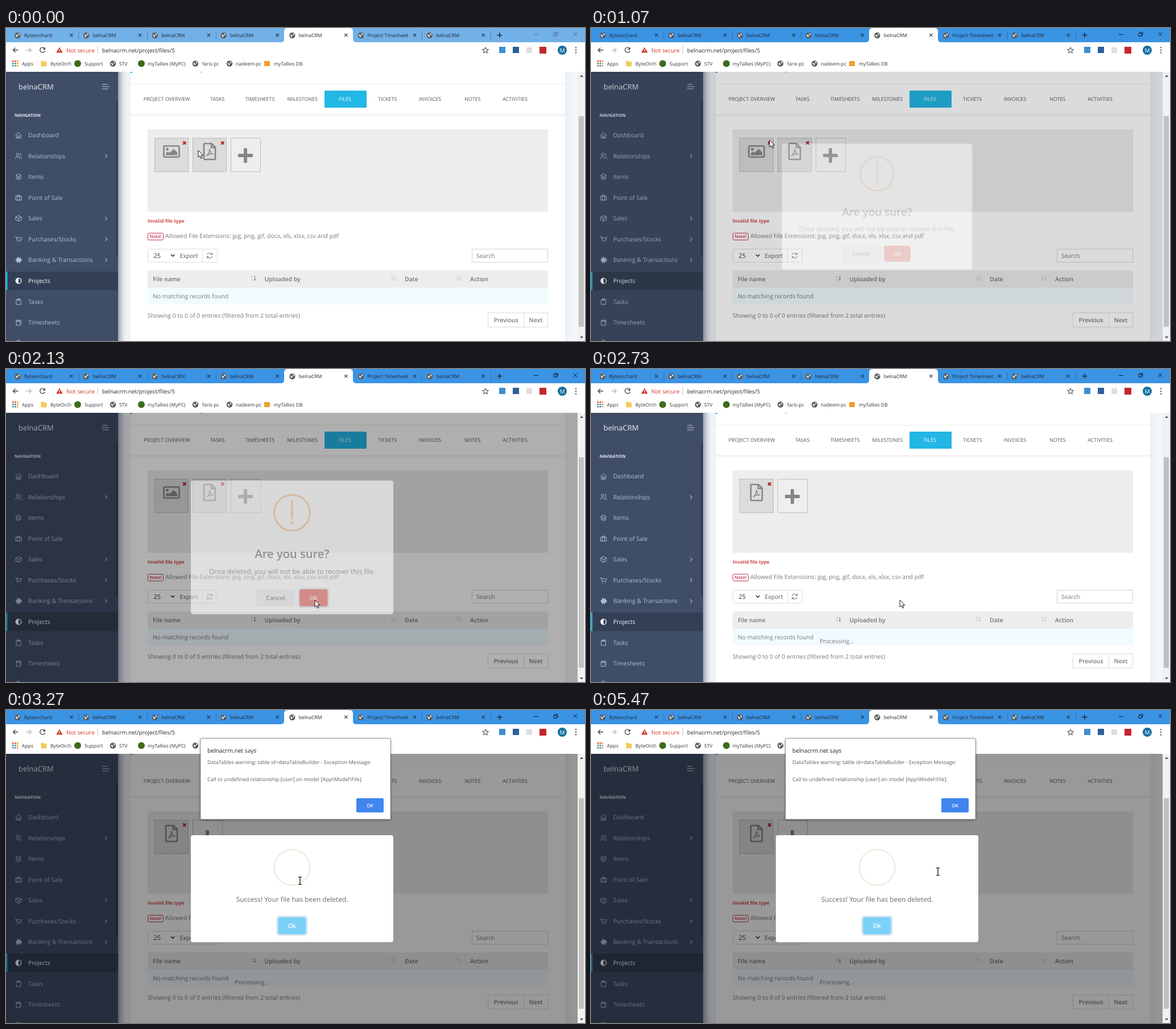
An HTML page for the animation above (6.59 s loop, 1018 by 550 pixels).

```html
<!DOCTYPE html>
<html lang="en">
<head>
<meta charset="utf-8">
<title>Project files</title>
<style>
html, body { margin: 0; width: 100%; height: 100%; overflow: hidden; background: #fff; }
svg { display: block; }
text { font-family: "Open Sans", "Noto Sans", sans-serif; text-rendering: geometricPrecision; white-space: pre; }
</style>
</head>
<body>
<svg id="stage" width="1018" height="550" viewBox="0 0 1018 550"></svg>
<script>
const LOOP = 6590, BRAND = 'belnaCRM', HOST = 'belnacrm.net';
const BASE = 10.43;

// Drawing helpers, all return SVG markup
const text = (x, y, s, size = BASE, fill = '#777', more = '') =>
  `<text x="${x}" y="${y}" font-size="${size}" fill="${fill}" ${more}>${s}</text>`;
const mid = 'text-anchor="middle" ', semi = 'font-weight="600"', bold = 'font-weight="700"';
const rect = (x, y, w, h, fill, more = '') =>
  `<rect x="${x}" y="${y}" width="${w}" height="${h}" fill="${fill}" ${more}/>`;
const dot = (x, y, r, fill, more = '') => `<circle cx="${x}" cy="${y}" r="${r}" fill="${fill}" ${more}/>`;
const line = (d, stroke, w = 1, more = '') =>
  `<path d="${d}" fill="none" stroke="${stroke}" stroke-width="${w}" ${more}/>`;
const fill = (d, color, more = '') => `<path d="${d}" fill="${color}" ${more}/>`;
const at = (x, y, body) => `<g transform="translate(${x} ${y})">${body}</g>`;
const group = (id, body) => `<g id="${id}">${body}</g>`;
const cross = (x, y, r, color, w) =>
  line(`M${x - r} ${y - r}l${2 * r} ${2 * r}m0 ${-2 * r}l${-2 * r} ${2 * r}`, color, w);
const globe = (x, y) => at(x, y, dot(0, 0, 5.2, '#55595e') +
  fill('M-4-1.5L-1-1 1 1-1 3.5-2.5 1.5ZM0-4L3.6-2.5 3 .5 1-1.5Z', '#e4e7ea'));

function browser() {
  const tabs = ['Byteorchard', BRAND, BRAND, BRAND, BRAND, 'Project Timesheet', BRAND];
  let s = rect(0, 0, 1018, 25, '#72b0e8', 'id="bar"') + rect(0, 25, 1018, 52, '#fff') +
    fill('M483 25q6 0 6-6V6q0-6 6-6H604q6 0 6 6V19q0 6 6 6z', '#fff');
  tabs.forEach((name, i) => {
    const x = 32 + i * 120.7;
    s += globe(x - 11.5, 13) + `<svg x="${x}" y="0" width="74" height="25">` +
      text(0, 16, name, 8.6, '#20272f') + '</svg>' + cross(x + 83, 12.5, 2.6, '#26313c', 1.1);
    if (i != 3 && i != 4) s += rect(x + 95.5, 6, 1, 14, '#32587c', 'opacity=".55"');
  });
  s += line('M863.5 12.5h9M868 8v9', '#1c2a38', 1.4) +
    group('win', line('M928 11.5h8M963 9.5h5v5h-5zM965 9.500V7.500h5v5h-2M997.5 7.500l6.500 6.500m0-6.500l-6.500 6.500', 'currentColor'));

  // Address row
  s += line('M21.5 38.8h-9m4-4l-4 4 4 4', '#45494d', 1.4) +
    line('M35.5 38.8h9m-4-4l4 4-4 4', '#b9bbbd', 1.4) +
    line('M68 36a4.5 4.5 0 1 0 .6 4', '#45494d', 1.4) + fill('M69 33.5v4.5h-4.5z', '#45494d') +
    fill('M94 33.5l5.8 10H88.2z', '#d23f31') + rect(93.4, 37, 1.2, 3, '#fff') + rect(93.4, 41, 1.2, 1.2, '#fff') +
    text(106, 42.5, 'Not secure', 9.85, '#d0342a') + rect(161, 32, 1, 13, '#c8c8c8') +
    text(169, 42.5, HOST + '/project/files/5', 9.85, '#26292c') +
    line('M843 34l1.5 3.3 3.6.4-2.7 2.4.8 3.6-3.2-1.9-3.2 1.9.8-3.6-2.7-2.4 3.6-.4z', '#555', 1.1) +
    rect(867, 33, 11, 11, '#3f8fd0') + rect(891, 33, 11, 11, '#2d5f9a') +
    rect(915, 34, 10, 10, '#dedede') + rect(938, 33, 12, 12, '#c2272d') +
    dot(978, 39, 8, '#146f9f') + text(978, 42.5, 'M', 10, '#fff', mid) +
    [34.5, 39, 43.5].map(y => dot(1002, y, 1.2, '#55595e')).join('');

  // Bookmarks
  const hues = ['#e04a3a', '#e04a3a', '#e8a02c', '#3c9b57', '#3d7fe0', '#e8a02c', '#3c9b57', '#3d7fe0', '#e8a02c'];
  hues.forEach((c, i) => s += rect(11 + i % 3 * 4, 57 + (i / 3 | 0) * 4, 2.6, 2.6, c));
  s += fill('M61.5 57.5h4l1 1.5h5v8.5h-10z', '#f3cb5c') + dot(126, 62.5, 6, '#3d6b1d') + dot(238, 62.5, 6, '#3d6b1d') +
    globe(188, 62.5) + globe(333, 62.5) + globe(393, 62.5) + rect(454, 58, 10, 9, '#f0a030');
  [[28, 'Apps'], [78, 'ByteOrch'], [138, 'Support'], [199, 'STV'], [249, 'myTallies (MyPC)'],
   [345, 'faris-pc'], [404, 'nadeem-pc'], [471, 'myTallies DB']]
    .forEach(([x, name]) => s += text(x, 66, name, 8.6, '#33373b'));
  return s;
}

function sidebar() {
  const items = [
    ['Dashboard', 'M-5 0L0-5 5 0M-4-1V5H4V-1M-1.2 5V1H1.2V5'],
    ['Relationships', 'M-5 5V4q0-3 3.5-3t3.5 3V5M-1.5-5a2 2 0 0 1 0 4.2a2 2 0 0 1 0-4.2M2.5-4.5a2 2 0 0 1 0 4M5.3 5V4q0-2-2-2.6', 1],
    ['Items', 'M0-5L5-2.5 0 0-5-2.5ZM-5 0L0 2.5 5 0M-5 2.5L0 5 5 2.5'],
    ['Point of Sale', 'M-5-2.5H5V4.5H-5ZM-2-2.5V-4.5H2V-2.5M-2-2.5V4.5M2-2.5V4.5'],
    ['Sales', 'M0-5L5-2.5V2.5L0 5-5 2.5V-2.5ZM-5-2.5L0 0 5-2.5M0 0V5', 1],
    ['Purchases/Stocks', 'M-6-4.5H-4L-2.5 2H4L5.5-2.5H-3.5M-2 4v1.4M3.5 4v1.4', 1],
    ['Banking &amp; Transactions', '', 1],
    ['Projects', ''],
    ['Tasks', 'M-4-3.5H4V5H-4ZM-1.8-5H1.8V-2.5H-1.8Z'],
    ['Timesheets', 'M-4-3.5H4V5H-4ZM-4-2H4M-2-5V-3M2-5V-3M1 1H4'],
  ];
  const piggy = '<ellipse rx="4.6" ry="3.6"/><path d="M3-2L5-1H6V2H4.500ZM1-3l3-2v3zM-3 2h2v3h-2zM1 2h2v3h-2zM-6.500-1.500l2 .5v1.500z"/><circle cx="-1" cy="-4" r="1.400"/>';
  let s = rect(0, 77, 197, 473, '#3f4d67') + rect(193, 129, 4, 271, '#343f55') +
    rect(0, 428, 197, 32.5, '#333f54') + rect(0, 428, 2.5, 32.5, '#23b7e5') +
    text(22, 107.5, BRAND, 13, '#eef1f6') +
    line('M169 99h9M169 103h13M169 107h11', '#c3cbdb', 1.1) +
    text(15, 155.8, 'NAVIGATION', 7.3, '#e8ecf4', bold);
  items.forEach(([name, icon, sub], i) => {
    const y = 188.4 + i * 36.55, on = name == 'Projects', c = on ? '#fff' : '#b3bfd5';
    s += at(22, y, line(icon, c)) + text(39, y + 3.7, name, BASE, c);
    if (sub) s += line(`M174.5 ${y - 3}l3 3-3 3`, c, 1.1);
    if (on) s += dot(22, y, 4.8, 'none', 'stroke="#fff" stroke-width="1.3"') + fill(`M22 ${y - 5}a5 5 0 0 0 0 10z`, '#fff');
    if (i == 6) s += at(22, y, `<g fill="${c}">${piggy}</g>`);
  });
  return s + line('M19 550v-1h6', '#b3bfd5');
}

const tile = (x, w, bg) => rect(x, 193.5, w, 59, bg, 'stroke="#a6a6a6" stroke-dasharray="2 1"');
const fileTile = (x, icon) => tile(x + .5, 59, '#dcdcdc') + at(x + 30, 217, icon) + cross(x + 52.8, 202, 2.6, '#b30d12', 2);
const pdfIcon = line('M-10-12.5q0-1.5 1.5-1.5H3.5L10-7.5V12.5q0 1.5-1.5 1.5H-8.500q-1.5 0-1.5-1.5ZM3-14V-7H10', '#868686', 2.6) +
  line('M-6 8Q0 4 0-4.5 1 4 6.5 4.5 0 3-6 8Z', '#868686', 1.5);
const imageIcon = rect(-13.5, -9.8, 27, 19.6, 'none', 'rx="2" stroke="#868686" stroke-width="2.6"') +
  dot(-7.5, -4, 2.4, '#868686') + fill('M-10 6.5V3.5L-6.5 0-3.500 2.5 4-4.5 10 1.5V6.5Z', '#868686');
const plusTile = x => tile(x + .5, 52, '#eee') +
  rect(x + 13, 221, 26, 6, '#868686', 'rx="1.5"') + rect(x + 23, 211, 6, 26, '#868686', 'rx="1.5"');

function content() {
  let s = rect(197, 77, 809, 473, '#f4f7fa') +
    rect(219, 40, 764, 550, '#fff', 'style="filter:drop-shadow(0 1px 7px #455a6418)"') +
    rect(197, 77, 16, 473, 'url(#shade)') +
    rect(219, 77, 3, 2, '#23b7e5') + rect(341, 77, 4, 1, '#d2c25a') +
    rect(219, 98, 764, 1, '#eee') + rect(219, 151, 764, 6, 'url(#fall)') +
    rect(560, 110, 74, 30, '#23b7e5', 'rx="1.5"');
  ['PROJECT OVERVIEW', 'TASKS', 'TIMESHEETS', 'MILESTONES', 'FILES', 'TICKETS', 'INVOICES', 'NOTES', 'ACTIVITIES']
    .forEach((name, i) => s += text(i ? 297 + i * 74.75 : 282.7, 128.2, name, 8.94, i == 4 ? '#fff' : '#555', mid));
  s += rect(249, 178, 704, 145, '#ededed') +
    group('before', fileTile(261, imageIcon) + fileTile(328, pdfIcon) + plusTile(395)) +
    group('after', fileTile(261, pdfIcon) + plusTile(328)) +
    text(249, 341.5, 'Invalid file type', 8.4, '#cf4a4a', bold) +
    rect(249.5, 360.5, 27, 12, '#fff', 'rx="2" stroke="#c8324a"') + text(263, 369.4, 'Note!', 7.9, '#c8324a', mid + semi) +
    text(280, 369, 'Allowed File Extensions: jpg, png, gif, docx, xls, xlsx, csv and pdf');
  const frame = 'stroke="#dcdcdc"';
  s += rect(249.5, 388.5, 122, 23, '#fff', frame + ' rx="2"') + rect(345, 388, 1, 24, '#dcdcdc') +
    text(259.5, 404, '25', 11, '#333') + line('M290 398l3.2 3.2 3.2-3.2', '#222', 1.5) +
    text(305.5, 403.8, 'Export', BASE, '#555') +
    line('M353.5 398.8a4.6 4 0 0 1 8.800-.8m.2-3v3h-3M362.7 401a4.6 4 0 0 1-8.8.8m-.2 3v-3h3', '#666') +
    rect(819.5, 388.5, 133, 23, '#fff', 'stroke="#d4d4d4"') + text(827, 403.8, 'Search') +
    rect(249, 426, 704, 30, '#ededed') + rect(249, 456, 704, 30, '#f1fbff') +
    rect(249, 455, 704, 1, '#e6e8ea');
  [[258, 'File name'], [454.5, 'Uploaded by'], [701, 'Date'], [816, 'Action']]
    .forEach(([x, name]) => s += text(x, 444.7, name, BASE, '#737373', semi));
  [435, 681.5, 796].forEach((x, i) => s +=
    line(`M${x - 2.5} 444v-8m-2 2l2-2 2 2`, '#c4c4c4') +
    line(`M${x + 2.5} 435.5v8m-2-2l2 2 2-2`, i ? '#c4c4c4' : '#777'));
  return s + text(258, 474.7, 'No matching records found') +
    group('wait', text(402, 482.3, 'Processing...')) +
    text(249, 509, 'Showing 0 to 0 of 0 entries (filtered from 2 total entries)') +
    rect(847.5, 500.5, 105, 25, '#fff', frame) + rect(910, 500, 1, 26, '#dcdcdc') +
    text(879, 517, 'Previous', BASE, '#777', mid + semi) + text(931.5, 517, 'Next', BASE, '#777', mid + semi);
}

const scrollbar = rect(1005, 77, 13, 473, '#f1f1f1') + rect(1007, 155, 9, 370, '#c1c1c1') +
  fill('M1009 86l3-3.5 3 3.5z', '#505050') + fill('M1009 542l3 3.5 3-3.5z', '#505050');

const ring = (id, x, y, w, h) => rect(x - 1.5, y - 1.5, w + 3, h + 3, 'none',
  `id="${id}" rx="4" stroke="#2b72a5" stroke-opacity=".3" stroke-width="1.5"`);
const button = (x, y, w, h, bg, label, color) => rect(x, y, w, h, bg, 'rx="3.7"') +
  text(x + w / 2, y + h / 2 + 3.7, label, BASE, color, mid + semi);

const confirmBox = rect(325, 196, 356, 235, '#fff', 'rx="3.7"') +
  dot(503, 252.7, 31.4, 'none', 'stroke="#f8c086" stroke-width="3"') +
  rect(501.3, 230, 3.5, 34, '#f8c086', 'rx="1.7"') + dot(503, 270.5, 2.6, '#f8c086') +
  text(503, 331.5, 'Are you sure?', 20.1, '#595959', mid + semi) +
  text(503, 359.5, 'Once deleted, you will not be able to recover this file.', 11.92, '#5c5c5c', mid) +
  button(440.5, 387, 67, 30, '#efefef', 'Cancel', '#555') + ring('ringCancel', 440.5, 387, 67, 30) +
  button(516, 387, 49.5, 30, '#e64942', 'Ok', '#fff') + ring('ringOk', 516, 387, 49.5, 30);
const successBox = rect(325, 220, 356, 188, '#fff', 'rx="3.7"') +
  dot(503, 276.5, 31.4, 'none', 'stroke="#eef0e2" stroke-width="3"') +
  text(503, 336.5, 'Success! Your file has been deleted.', 11.92, '#666', mid) +
  button(478, 364, 49.5, 30, '#7cd1f9', 'Ok', '#fff') + ring('ringDone', 478, 364, 49.5, 30);

const alertBox = rect(342, 50, 334, 142, '#fff', 'rx="1.5" stroke="#8a8a8a" stroke-width=".8" style="filter:drop-shadow(0 1px 2px #0006)"') +
  text(354, 74.5, HOST + ' says', 10.2, '#222') +
  text(354, 95.3, 'DataTables warning: table id=dataTableBuilder - Exception Message:', 9.15, '#5c6066') +
  text(354, 125, 'Call to undefined relationship [user] on model [App\\Model\\File].', 9.2, '#5c6066') +
  rect(616, 155, 48, 25, '#4086ee', 'rx="2"') + text(640, 170.5, 'OK', 8.3, '#fff', mid + semi);

const stage = document.getElementById('stage');
stage.innerHTML = `<defs>
  <linearGradient id="shade">${[.5, .3, .15, .05, 0].map((a, i) =>
    `<stop offset="${i / 4}" stop-color="#3f4d67" stop-opacity="${a}"/>`).join('')}</linearGradient>
  <linearGradient id="fall" x2="0" y2="1"><stop stop-color="#f0f0f0"/><stop offset="1" stop-color="#fff"/></linearGradient>
  <clipPath id="view"><path d="M0 77H1005V550H0Z"/></clipPath></defs>` +
  content() + sidebar() +
  `<g clip-path="url(#view)">` +
  group('overlay', rect(0, 77, 1005, 473, '#000', 'opacity=".4"') +
    group('modal', group('confirm', confirmBox) + group('success', successBox))) + '</g>' +
  scrollbar + browser() + group('alert', alertBox) +
  group('arrow', fill('M0 0V12.2L2.8 9.6 4.8 14.2 6.8 13.3 4.9 8.9H8.8Z', '#fff', 'stroke="#000" stroke-width=".9"')) +
  group('beam', line('M-3-6.5h2q1 0 1 1v11q0 1-1 1h-2M3-6.5h-2q-1 0-1 1m0 11q0 1 1 1h2', '#000', 1.2));

const el = id => document.getElementById(id);
const set = (id, name, value) => el(id).setAttribute(name, value);
const show = (id, on) => set(id, 'visibility', on ? 'visible' : 'hidden');
const clamp = x => Math.min(1, Math.max(0, x));

// The CSS "ease" curve
function ease(x) {
  let lo = 0, hi = 1, u = .5;
  for (let i = 0; i < 22; i++) {
    const v = 1 - u;
    if (.75 * u * v + u ** 3 < x) lo = u; else hi = u;
    u = (lo + hi) / 2;
  }
  return .3 * u * (1 - u) ** 2 + 3 * u * u * (1 - u) + u ** 3;
}

const OPEN = 1003, CLOSE = 2080, REOPEN = 2760;
const rise = (t, from, dur) => ease(clamp((t - from) / dur));
const fade = (t, dur) => rise(t, OPEN, dur) - rise(t, CLOSE, dur) + rise(t, REOPEN, dur);

function bounce(p) {
  const keys = [[0, .5], [.45, 1.05], [.8, .95], [1, 1]];
  if (p >= 1) return 1;
  const i = keys.findIndex(k => k[0] > p), [a, from] = keys[i - 1], [b, to] = keys[i];
  return from + (to - from) * ease((p - a) / (b - a));
}

// Pointer path: time, x, y
const path = [
  [0, 338, 215], [330, 310, 203], [400, 310, 203], [530, 308, 206], [670, 314, 197], [1070, 314, 197],
  [1200, 325, 234], [1330, 390, 238], [1470, 446, 224], [1600, 520, 350], [1670, 543, 406], [2730, 543, 406],
  [2930, 517, 329], [3130, 517, 310], [3270, 517, 300], [3470, 517, 300], [3670, 575, 327], [3800, 604, 310],
  [3930, 545, 200], [4130, 420, 80], [4330, 449, 124], [4530, 516, 156], [4670, 387, 66],
  [4800, 438, 104], [5000, 560, 150], [5200, 662, 205], [5400, 612, 280], [5470, 610, 284], [LOOP, 610, 284]];

function pointer(t) {
  const i = path.findIndex(k => k[0] > t), [a, x, y] = path[i - 1], [b, x2, y2] = path[i];
  const p = (t - a) / (b - a);
  return [x + (x2 - x) * p, y + (y2 - y) * p];
}

function draw(now) {
  const step = Math.floor((now % LOOP + 4) * .015);
  const t = Math.min(Math.round(step / .15) * 10, LOOP - 1);

  const active = t >= 870, deleted = t >= 2470, done = t >= 2700;
  set('bar', 'fill', active ? '#3b93e4' : '#72b0e8');
  set('win', 'color', active ? '#0c1a28' : '#54708c');
  show('before', !deleted);
  show('after', deleted);
  show('wait', t >= 2530);

  show('confirm', !done);
  show('success', done);
  show('ringCancel', t < 1870);
  show('ringOk', t >= 1870 && !done);
  show('ringDone', done);
  set('overlay', 'opacity', fade(t, 300));
  set('modal', 'opacity', fade(t, 200));
  const scale = bounce(Math.max(0, t - (done ? REOPEN : OPEN)) / 300);
  set('modal', 'transform', `translate(503 313.6) scale(${scale}) translate(-503 -313.6)`);

  const pop = clamp((t - 3080) / 180);
  set('alert', 'opacity', pop);
  set('alert', 'transform', `translate(509 121) scale(${.8 + .2 * pop}) translate(-509 -121)`);

  const [x, y] = pointer(t);
  const beam = done && x > 325 && x < 681 && y > 220 && y < 360;
  show('beam', beam);
  show('arrow', !beam);
  set(beam ? 'beam' : 'arrow', 'transform', `translate(${x} ${y})`);
}

const start = performance.now();
function tick() {
  draw(performance.now() - start);
  requestAnimationFrame(tick);
}
tick();
</script>
</body>
</html>
```
